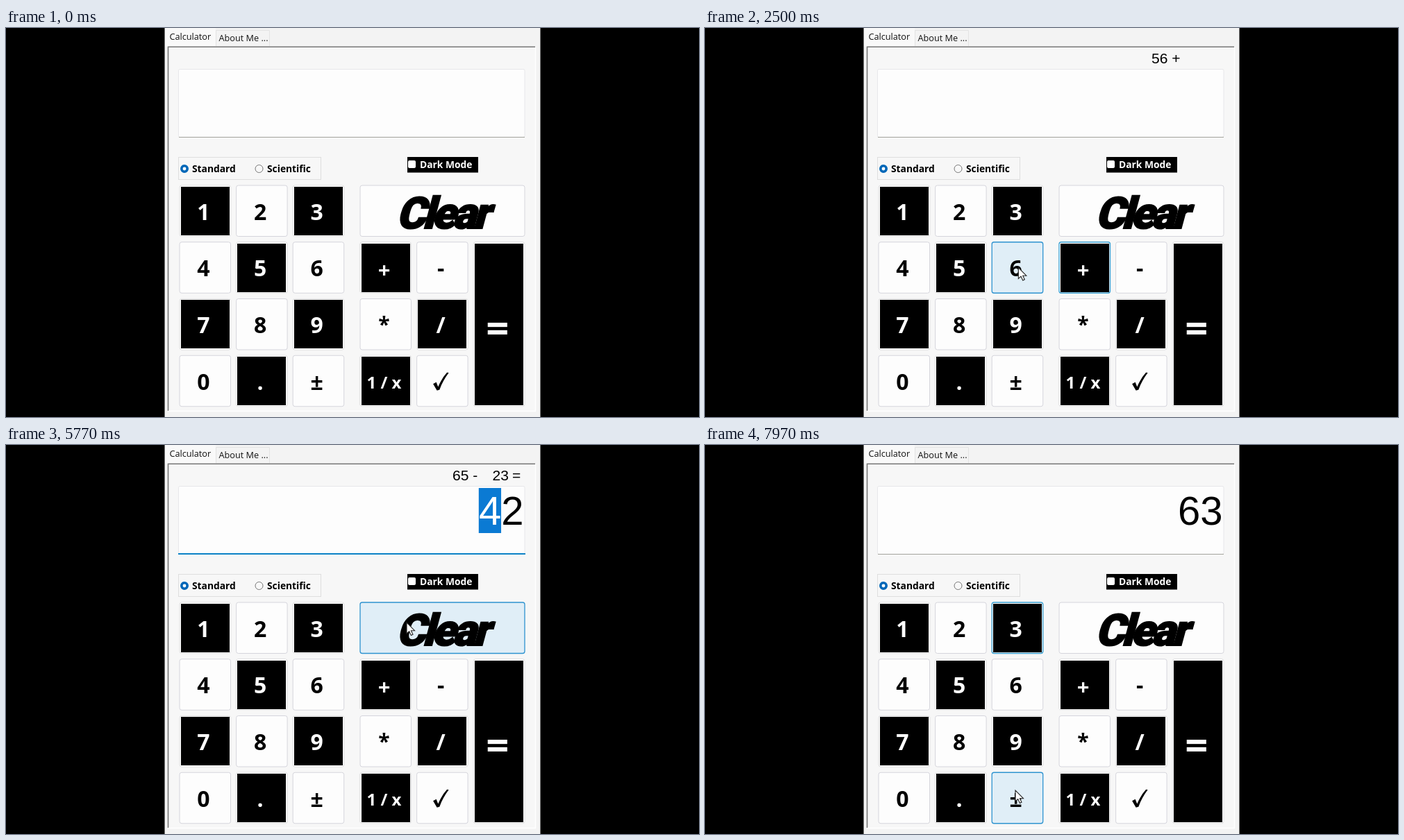
An HTML page for the animation above (8000 ms loop, 998 by 561 pixels).

```html
<!DOCTYPE html>
<html lang="en">
<head>
<meta charset="utf-8">
<title>Calculator</title>
<style>
html, body { margin: 0; width: 100%; height: 100%; overflow: hidden; background: #000; }
svg { display: block; width: 100%; height: 100%; font-family: "Open Sans", "Noto Sans", sans-serif; }
text { white-space: pre; }
.small { font-size: 12.7px; fill: #111; }
.bold { font-size: 13.8px; font-weight: 700; }
.key rect { fill: #fdfdfd; stroke: #d5d5dc; }
.key .ink { fill: #000; stroke: none; }
.key text { font-weight: 700; text-anchor: middle; }
.dark text { fill: #fff; }
.dark > rect:first-child { stroke: #dededf; }
.key.focus > rect:first-child { stroke: #359cce; stroke-width: 1.3; }
.key.hover > rect:first-child { stroke: #2e93d0; stroke-width: 1.3; fill: #e0eef7; }
.key .clear {
  font-family: Roboto, "Open Sans", sans-serif; font-stretch: 75%; font-weight: 900;
  letter-spacing: -4px; stroke: #000; stroke-width: 2;
}
.screen { font: 58px "Liberation Sans", Arial, sans-serif; text-anchor: end; }
.label { font: 21px "Liberation Sans", Arial, sans-serif; }
</style>
</head>
<body>
<svg viewBox="0 0 998 561" preserveAspectRatio="none">
  <defs>
    <clipPath id="screenClip"><rect x="249" y="61" width="498" height="95"/></clipPath>
    <clipPath id="selClip"><rect class="sel" y="62" height="65"/></clipPath>
  </defs>
  <rect width="998" height="561"/>
  <rect x="228.5" width="541" height="561" fill="#f3f3f3"/>

  <rect x="234" y="27" width="528" height="525" fill="#f7f7f7"/>
  <rect x="229" width="73" height="27" fill="#f9f9f9"/>
  <path d="M302.5 3V26M302 3.5H379.5V26" fill="none" stroke="#e3e3e3"/>
  <path d="M233.5 552V27.3H762" fill="none" stroke="#777" stroke-width="1.6"/>
  <path d="M234 552.5H762.5V28" fill="none" stroke="#fff" stroke-width="1.5"/>
  <text class="small" x="235.5" y="17">Calculator</text>
  <text class="small" x="306.5" y="18.5">About Me ...</text>

  <rect x="248.5" y="59.5" width="498.5" height="98" rx="2" fill="#fdfdfd" stroke="#e7e7ea"/>
  <path id="underline"/>
  <g clip-path="url(#screenClip)">
    <g id="plain"></g>
    <rect class="sel" y="62" height="65" fill="#0b7ad3"/>
    <g id="selected" fill="#fff" clip-path="url(#selClip)"></g>
    <rect id="caret" x="744.5" y="62" width="1" height="65" fill="#e09a4a"/>
  </g>
  <g class="label">
    <text id="left" y="51"></text>
    <text id="right" x="700.5" y="51"></text>
    <text id="equals" x="729" y="51">=</text>
  </g>

  <rect x="248.5" y="186.5" width="205" height="32" fill="none" stroke="#dedede"/>
  <circle cx="257" cy="203" r="4.2" fill="#fff" stroke="#0067b8" stroke-width="3.6"/>
  <circle cx="364.5" cy="203" r="5.5" fill="#f8f8f8" stroke="#777"/>
  <text class="bold" x="268" y="208">Standard</text>
  <text class="bold" x="376" y="208">Scientific</text>
  <rect x="578" y="186" width="102" height="22.5"/>
  <rect x="579" y="191" width="11" height="11" rx="2" fill="#fff"/>
  <text class="bold" x="596" y="202" fill="#fff">Dark Mode</text>

  <g id="keys"></g>
  <path id="arrow" d="M0 0V16L3.7 12.7L6.4 18.4L9 17.2L6.4 11.7H11.5Z" fill="#fff" stroke="#222" stroke-width="1.1"/>
  <path id="beam" d="M-2.5 -6.5H2.5M0 -6.5V6.5M-2.5 6.5H2.5" fill="none" stroke="#222" stroke-width="1.1"/>
</svg>
<script>
const LOOP = 8000;
const $ = id => document.getElementById(id);
const show = (el, on) => el.setAttribute('visibility', on ? 'visible' : 'hidden');

// Keypad: evenly pitched rows of keys; a leading # marks a dark key.
const columns = [250, 331.6, 413.2, 510, 591.6, 673.3];
const layout = [
  ['#1', '2', '#3', 'Clear'],
  ['4', '#5', '6', '#+', '-', '#='],
  ['#7', '8', '#9', '*', '#/'],
  ['0', '#.', '±', '#1 / x', '✓']
];
const rowPitch = 81.75, side = 73.5;
const keys = {};

function glyph(name, x, y) {
  const cx = x + 34.5;
  if (name === 'Clear')
    return `<text class="clear" font-size="63" transform="translate(627 288.5) skewX(-15)">Clear</text>`;
  if (name === '✓')
    return `<path transform="translate(${cx} ${y + 37})" d="M-11 4L-6.5 1.5L-3.8 8.2Q2 -5 9 -12.5L11.5 -12Q3 -1 -1.8 12.5L-5.5 13.5Z"/>`;
  const [size, base] = { '=': [58, 145], '1 / x': [24, 47.5], '+': [31, 51], '*': [30, 47.5] }[name] || [32, 49.7];
  return `<text x="${cx}" y="${y + base}" font-size="${size}">${name}</text>`;
}

layout.forEach((row, r) => row.forEach((cell, c) => {
  const dark = cell[0] === '#', name = cell.replace('#', '');
  const x = columns[c], y = 227 + rowPitch * r;
  const w = name === 'Clear' ? 237 : side;
  const h = name === '=' ? side + 2 * rowPitch : side;
  const el = document.createElementNS('http://www.w3.org/2000/svg', 'g');
  const inkX = Math.round(x + 1.75), inkY = Math.round(y + 1.75);
  el.innerHTML = `<rect x="${x}" y="${y}" width="${w}" height="${h}" rx="3"/>` +
    (dark ? `<rect class="ink" x="${inkX}" y="${inkY}" width="${w - 3.5}" height="${Math.floor(h - 3.5)}"/>` : '') +
    glyph(name, x, y);
  $('keys').append(el);
  keys[name] = { el, dark, x, y, w, h };
}));

// Pointer itinerary: time, key to press or point, optional text selection.
const steps = [
  [150, [620, 610]], [750, [585, 420]], [1250, 'Clear'], [1350, [600, 266]],
  [1670, [352, 335]], [1720, '5'], [1950, '6'], [2250, '+'], [2520, '6'], [2820, '='],
  [3060, [744, 100], [2, 2]], [3140, [713, 92], [1, 2]], [3210, [682, 78], [0, 2]],
  [3370, [641, 46]], [3600, [641, 46]], [4200, 'Clear'], [4350, [600, 266]],
  [4770, [425, 340]], [4810, '6'], [4930, '5'], [5070, '-'], [5220, '2'], [5320, '3'], [5460, '='],
  [5590, [713, 108], [1, 1]], [5650, [684, 108], [0, 1]], [5770, [577, 256]],
  [5830, 'Clear'], [6030, '1'], [6220, '/'], [6400, '3'], [6600, '='],
  [6800, [638, 103]], [6960, [638, 103]], [7200, 'Clear'], [7480, '6'], [7730, '3'],
  [7970, [447, 498]], [LOOP, [447, 498]]
].map(([t, spot, sel]) => {
  const key = typeof spot === 'string' ? spot : null;
  const k = keys[key];
  const [x, y] = k ? [k.x + Math.min(k.w / 2, 76), k.y + Math.min(k.h / 2, 90)] : spot;
  return { t, key, sel, x, y };
});

const operations = {
  '+': (a, b) => a + b, '-': (a, b) => a - b, '*': (a, b) => a * b, '/': (a, b) => a / b
};

function press(s, key) {
  s.focus = key;
  s.sel = null;
  if (key === 'Clear') {
    s.value = s.first = s.op = s.second = '';
  } else if (key === '=') {
    s.second = s.value;
    s.value = String(operations[s.op](+s.first, +s.second));
  } else if (operations[key]) {
    Object.assign(s, { first: s.value, op: key, value: '' });
  } else {
    s.value += key;
  }
}

function stateAt(t) {
  const s = { value: '', first: '', op: '', second: '', focus: '', sel: null };
  for (const step of steps) {
    if (step.t > t) break;
    if (step.key) press(s, step.key);
    if (step.sel) Object.assign(s, { sel: step.sel, focus: 'screen' });
  }
  return s;
}

function pointerAt(t) {
  const i = steps.findIndex(s => s.t > t);
  if (i < 1) return steps[0];
  const a = steps[i - 1], b = steps[i];
  const p = (t - a.t) / (b.t - a.t), e = p * p * (3 - 2 * p);
  return { x: a.x + (b.x - a.x) * e, y: a.y + (b.y - a.y) * e };
}

const inside = (p, b) => p.x >= b.x && p.x <= b.x + b.w && p.y >= b.y && p.y <= b.y + b.h;
const screenBox = { x: 249, y: 60, w: 498, h: 97 };

function render(t) {
  const s = stateAt(t), p = pointerAt(t);
  for (const [name, k] of Object.entries(keys))
    k.el.setAttribute('class', 'key' + (k.dark ? ' dark' : '') +
      (s.focus === name ? ' focus' : '') + (inside(p, k) ? ' hover' : ''));

  const lines = [s.value.slice(0, 15), s.value.slice(15)];
  const markup = lines.map((line, i) =>
    `<text class="screen" x="745.5" y="${114.5 + 65 * i}">${line}</text>`).join('');
  $('plain').innerHTML = $('selected').innerHTML = markup;

  const [from, to] = s.sel || [0, 0], pitch = 32.25;
  document.querySelectorAll('.sel').forEach(r => {
    r.setAttribute('x', 745.3 - (s.value.length - from) * pitch);
    r.setAttribute('width', (to - from) * pitch);
  });
  show($('caret'), to > from && to === s.value.length);

  const active = s.focus === 'screen';
  $('underline').setAttribute('d', active ? 'M248 157H748' : 'M249 157.5H747');
  $('underline').setAttribute('stroke', active ? '#0b82c6' : '#a3a39c');
  $('underline').setAttribute('stroke-width', active ? 2 : 1);

  $('left').textContent = s.op && `${s.first} ${s.op}`;
  $('left').setAttribute('x', 703 - 30 * s.first.length);
  $('right').textContent = s.second;
  show($('equals'), s.second);

  const typing = inside(p, screenBox);
  show($('beam'), typing);
  show($('arrow'), !typing);
  $(typing ? 'beam' : 'arrow').setAttribute('transform', `translate(${p.x} ${p.y})`);
}

const start = performance.now();
function tick() {
  render((performance.now() - start) % LOOP);
  requestAnimationFrame(tick);
}
tick();
</script>
</body>
</html>
```
